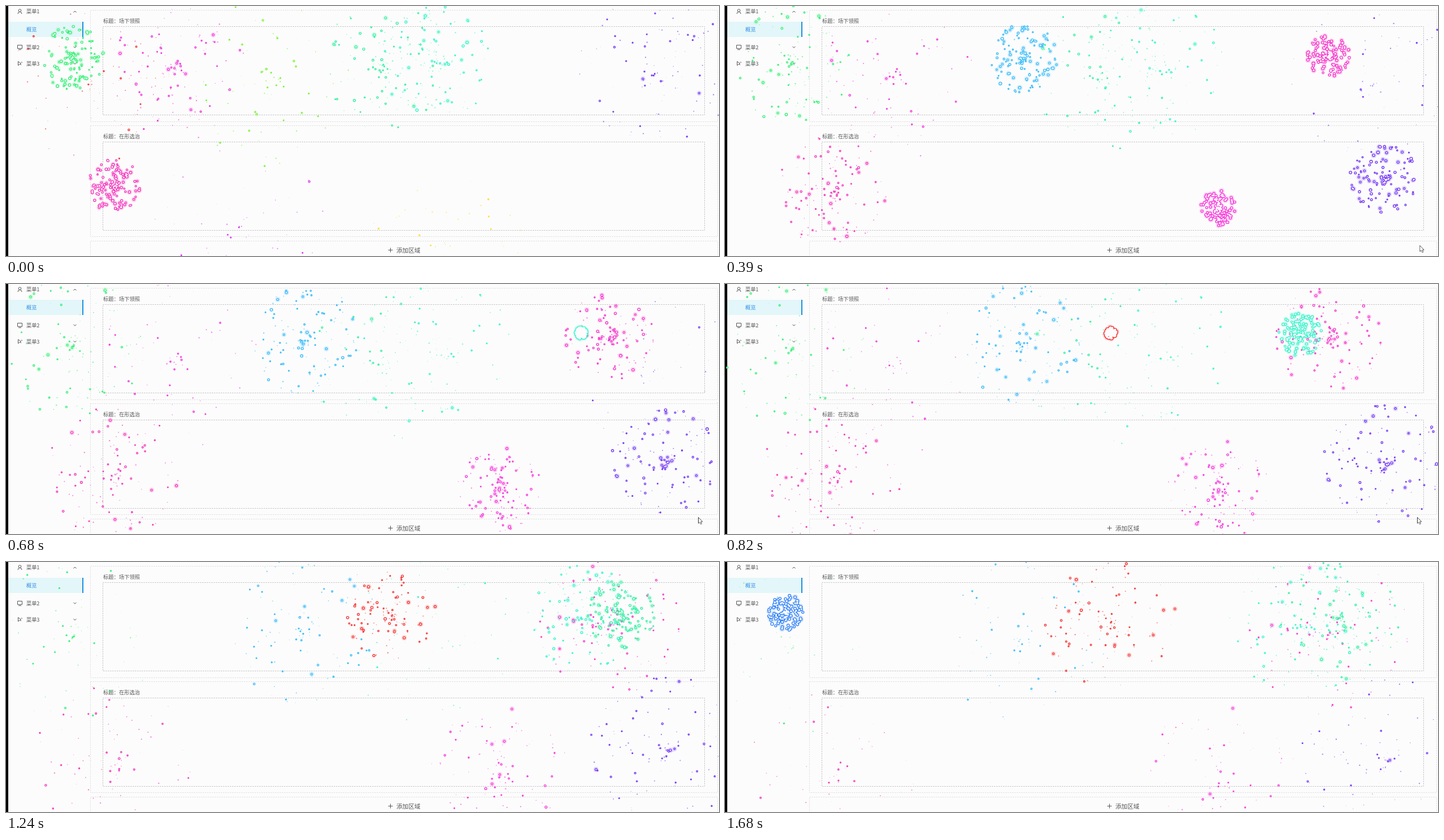
These frames come from a looping animation (1262x444 px, 1780 ms). An HTML page with a canvas:

```html
<!DOCTYPE html>
<html>
<head>
<meta charset="utf-8">
<title>Fireworks over a dashboard</title>
<style>
  html, body { margin: 0; width: 1262px; height: 444px; overflow: hidden; background: #fcfcfc; }
  svg, canvas { position: absolute; left: 0; top: 0; display: block; }
  text { font-family: "Noto Sans CJK SC", "Noto Sans CJK", sans-serif; fill: #555; }
  .menu { font-size: 9.2px; }
  .title { font-size: 9.3px; }
  .line { fill: none; stroke: #555; stroke-width: 1; }
  .dash { fill: none; stroke-width: 1; stroke-dasharray: 2.2 1.8; }
  .outer { stroke: #dcdcdc; }
  .inner { stroke: #bdbdbd; }
</style>
</head>
<body>
<svg width="1262" height="444" viewBox="0 0 1262 444">
  <rect width="1262" height="444" fill="#fcfcfc"/>
  <rect width="4" height="444" fill="#000"/>
  <rect x="4" y="28" width="133" height="27" fill="#e3f6f9"/>
  <rect x="135" y="28" width="2" height="27" fill="#1890e0"/>

  <g class="menu">
    <text x="36" y="13.3">菜单1</text>
    <text x="36" y="45.2" style="fill:#2f8fe8">概览</text>
    <text x="36" y="76.5">菜单2</text>
    <text x="36" y="105.5">菜单3</text>
  </g>
  <g class="line">
    <circle cx="24.5" cy="8" r="2.3"/>
    <path d="M21 14q0-3.5 3.5-3.5T28 14"/>
    <path d="M20.5 69.5h8v6h-8zM22 77.5h5"/>
    <path d="M21.5 98.5v7l5-3.5zM27 99.5l2 1M26.5 105l-1-2"/>
    <path d="M119.5 11.5l2.5-2.5 2.5 2.5M119.5 71.8l2.5 2.5 2.5-2.5M119.5 100.8l2.5 2.5 2.5-2.5"/>
    <path d="M676.5 433.5h8M680.5 429.5v8"/>
  </g>

  <g class="dash outer">
    <rect x="149.5" y="7.5" width="1110" height="198"/>
    <rect x="149.5" y="212.5" width="1110" height="197"/>
    <rect x="149.5" y="417.5" width="1110" height="40"/>
  </g>
  <g class="dash inner">
    <rect x="171.5" y="36.5" width="1065" height="157"/>
    <rect x="171.5" y="241.5" width="1065" height="157"/>
  </g>
  <g class="title">
    <text x="172" y="29.8">标题：场下领照</text>
    <text x="172" y="234.8">标题：在形选治</text>
  </g>
  <text x="691" y="437.6" font-size="10.6">添加区域</text>
</svg>
<canvas id="sky" width="1262" height="444"></canvas>

<script>
const LOOP = 1780;
const STEPS = [0, 130, 250, 390, 550, 680, 820, 980, 1110, 1240, 1370, 1520, 1680];
const COUNT = 125;
const MAX_AGE = 14;
const TAU = Math.PI * 2;
const ctx = document.getElementById('sky').getContext('2d');

// x, y, birth (in steps), colour
const bursts = [
  [153, 87, -12.2, '#f22a2a'],
  [415, 338, -12.5, '#d72cf0'],
  [773, 393, -11.5, '#ffdc3c'],
  [468, 87, -11.3, '#70f52c'],
  [1148, 87, -8.6, '#6c2cf5'],
  [301, 87, -7.05, '#f22cd8'],
  [668, 87, -5.5, '#2af09c'],
  [762, 87, -4.4, '#2cf5c4'],
  [117, 87, -1.8, '#2cf070'],
  [193, 316, -1.4, '#f52cb8'],
  [528, 87, 1, '#2cb8fa'],
  [1167, 302, 1, '#6c2cf5'],
  [1068, 87, 2, '#f82cc8'],
  [873, 357, 2.25, '#f82cd8'],
  [1018, 87, 5, '#2cf5c8'],
  [683, 87, 6, '#f52a2a'],
  [1089, 87, 7, '#2cf0a0'],
  [108, 87, 11.2, '#2c80fa']
].map(([x, y, birth, color], i) => ({ x, y, birth, color, sparks: makeSparks(i * 97 + 11) }));

function random(seed) {
  return () => {
    seed = (seed + 0x6D2B79F5) | 0;
    let v = Math.imul(seed ^ (seed >>> 15), 1 | seed);
    v = (v + Math.imul(v ^ (v >>> 7), 61 | v)) ^ v;
    return ((v ^ (v >>> 14)) >>> 0) / 4294967296;
  };
}

function makeSparks(seed) {
  const rnd = random(seed);
  return Array.from({ length: COUNT }, () => ({
    angle: rnd() * TAU,
    speed: rnd() < 0.13 ? 0.2 * rnd() : rnd() ** 0.55,
    size: 0.28 + 0.72 * rnd(),
    life: 7 + 13 * rnd(),
    phase: rnd() * TAU,
    glow: rnd() < 0.45
  }));
}

function fillDots(dots, grow, color, alpha) {
  ctx.beginPath();
  for (const d of dots) {
    const r = d.r + grow;
    if (r <= 0) continue;
    ctx.moveTo(d.x + r, d.y);
    ctx.arc(d.x, d.y, r, 0, TAU);
  }
  ctx.globalAlpha = alpha;
  ctx.fillStyle = color;
  ctx.fill();
  ctx.globalAlpha = 1;
}

function drawBurst(b, step) {
  const age = step - b.birth;
  if (age < 0 || age > MAX_AGE) return;
  const reach = 10 + 155 * (1 - Math.exp(-0.2 * age));
  const fall = 2.4 * age + 0.18 * age * age;
  const spread = Math.min(1, age / 3);
  const dots = [];
  for (const s of b.sparks) {
    if (age >= s.life) continue;
    const flicker = 1 - spread * 0.3 * (1 + Math.sin(s.phase + age * 2.3)) / 2;
    const base = 1 + (s.size - 1) * spread;
    dots.push({
      x: b.x + Math.cos(s.angle) * s.speed * reach,
      y: b.y + fall + Math.sin(s.angle) * s.speed * reach,
      r: 3.4 * base * flicker * (1 - age / s.life) ** 0.35,
      glow: s.glow
    });
  }
  const rings = dots.filter(d => d.r > 1.5);
  fillDots(rings.filter(d => d.glow && d.r > 2.1), 2.2, b.color, 0.18);
  fillDots(dots.filter(d => d.r <= 1.5), -0.2, b.color, 0.55);
  fillDots(rings, 0, b.color, 0.95);
  // Shared inner fill leaves one outline around touching sparks
  fillDots(rings, -1.35, '#fdfbfd', 1);
}

function drawCursor(x, y) {
  ctx.save();
  ctx.translate(x, y);
  ctx.fillStyle = '#fff';
  ctx.strokeStyle = '#333';
  ctx.lineWidth = 1;
  ctx.stroke(new Path2D('M0.5 0.5v10.5l2.4-2.2 1.8 3.8 1.7-.8-1.8-3.7h3.1z'));
  ctx.fill(new Path2D('M1 1.5v8.5l2-1.8 1.9 4 .9-.4-1.9-4h2.7z'));
  ctx.restore();
}

const start = performance.now();
let shown = -1;

function frame() {
  const t = (performance.now() - start) % LOOP;
  const step = STEPS.findLastIndex(s => s <= t);
  if (step !== shown) {
    shown = step;
    ctx.clearRect(0, 0, 1262, 444);
    for (const b of bursts) drawBurst(b, step);
    if (step >= 2 && step <= 8) {
      if (step < 4) drawCursor(1229.5, 425);
      else drawCursor(1225, step < 7 ? 414 : 420);
    }
  }
  requestAnimationFrame(frame);
}
frame();
</script>
</body>
</html>
```
